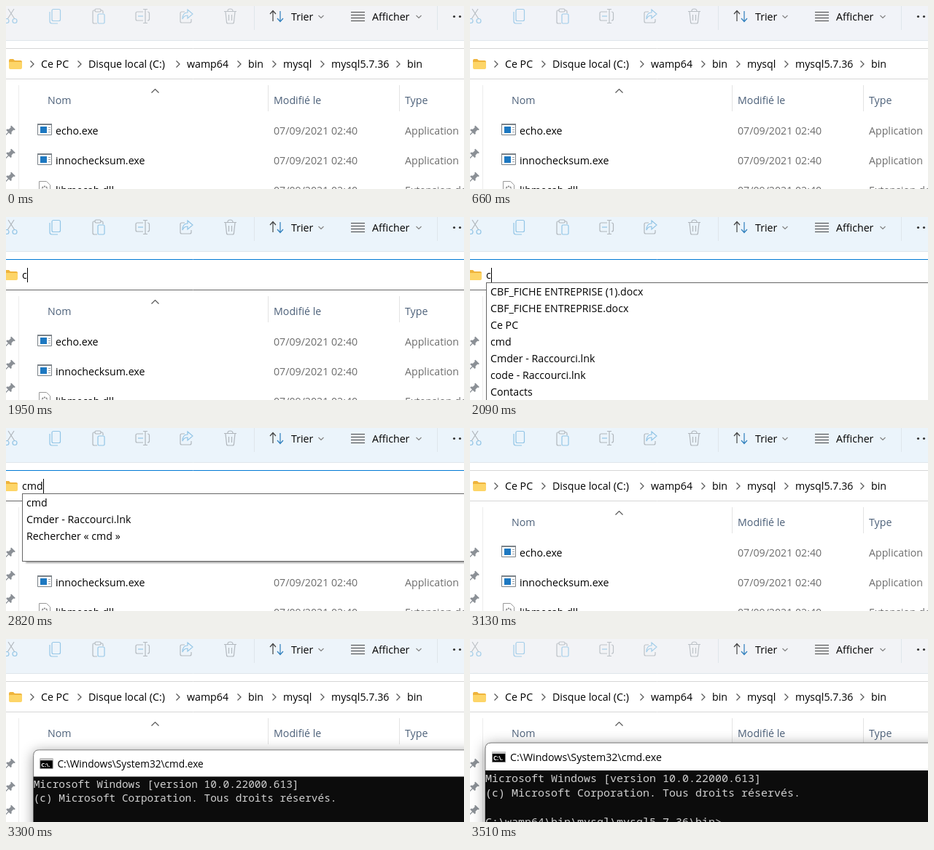
Animation, 628 px wide and 252 px high, one loop 5.15 s. Source, as an HTML page:

```html
<!DOCTYPE html>
<html lang="fr">
<head>
<meta charset="utf-8">
<title>Ouvrir cmd depuis l'explorateur</title>
<style>
  html, body { margin: 0; width: 100%; height: 100%; overflow: hidden; background: #fff; }
  svg { display: block; width: 628px; height: 252px; }
  text { font: 14.2px "Open Sans", "Noto Sans", sans-serif; fill: #000; white-space: pre; }
  .head { fill: #4c6079; }
  .dim { fill: #6d6d6d; }
  .line { fill: none; stroke: #555; stroke-width: 1.2; }
  .blue { fill: none; stroke: #92c5e6; stroke-width: 1.2; }
  .gray { fill: none; stroke: #b0b6bc; stroke-width: 1.2; }
  .console text { font: 15px "Noto Sans Mono", "DejaVu Sans Mono", monospace; fill: #d0d0d0; }
  #cmd { transform-origin: 480px 413px; }
</style>
</head>
<body>
<svg viewBox="0 0 628 252">
  <defs>
    <path id="chevron" class="line" d="M-2.5-4.5 2 0-2.5 4.5"/>
    <path id="pin" fill="#8b9096" transform="scale(.88)" d="M4-7l6 6-1 1-2-.3-3 3 .2 3-1.5 1.2-3-3-4 4-1-1 4-4-3-3 1.2-1.5 3 .2 3-3-.3-2z"/>
    <g id="exe">
      <path fill="#fff" stroke="#7b8288" d="M.5.5h19v15H.5z"/>
      <path fill="#7b8288" d="M0 0h20v2H0z"/>
      <path fill="#1d78c1" d="M4 4h9v9H4z"/>
      <path stroke="#9aa3ab" d="M15 5.500h3M15 8.500h3M15 11.500h3"/>
    </g>
    <g id="folder">
      <path fill="#efb43c" d="M0 2q0-2 2-2h4l2 2h8q2 0 2 2v8H0z"/>
      <path fill="#fdd568" d="M0 5q0-1 1-1h16q1 0 1 1v7q0 2-2 2H2q-2 0-2-2z"/>
    </g>
  </defs>

  <rect width="628" height="252" fill="#fff"/>
  <rect width="628" height="48" fill="#f2f3f6"/>
  <rect id="tint" width="628" height="48" fill="#ebf4fb"/>
  <path stroke="#dfe6eb" d="M0 47.500h628M340.500 0v33M591.500 0v33"/>

  <g id="tools">
    <path class="gray" d="M3 4l9 14M11 4L2 18"/>
    <circle class="blue" cx="1" cy="20.500" r="3"/><circle class="blue" cx="12" cy="20.500" r="3"/>
    <rect class="blue" x="63" y="4.500" width="11.500" height="16" rx="2"/>
    <path class="blue" d="M60 8v13q0 3 3 3h8"/>
    <path class="gray" d="M122 6h-2q-1 0-1 2v14q0 2 2 2h4M130 6h2q1 0 1 2v2"/>
    <rect class="gray" x="122" y="4" width="8" height="4" rx="1.500"/>
    <rect class="blue" x="126" y="11" width="9" height="13" rx="1.500"/>
    <path class="gray" d="M188 8h-8q-2 0-2 2v8q0 2 2 2h8M194 8q2.500 0 2.500 2v8q0 2-2.500 2M188 4.500h6M188 23.500h6M191 4.500v19"/>
    <path class="blue" stroke-width="2" d="M181 14h7"/>
    <path class="gray" d="M245 8h-4q-2 0-2 2v11q0 2 2 2h11q2 0 2-2v-3"/>
    <path class="blue" d="M249 5l7 6-7 6v-4q-5 0-7 5 0-9 7-9z"/>
    <path class="gray" d="M299 7.500h17M304 7q0-3 3.500-3t3.500 3M301 8l1.500 14q0 2 2 2h6q2 0 2-2L314 8M305.500 12v8M309.500 12v8"/>
  </g>
  <g fill="none" stroke-width="1.2">
    <path stroke="#444" d="M366 21V7M362 11l4-4.500 4 4.500"/>
    <path stroke="#2f7fbd" d="M376 7v14M372 17l4 4.500 4-4.500"/>
    <path stroke="#444" d="M473 8.500h19M473 12.500h19M473 16.500h19M473 20.500h19"/>
    <path stroke="#858585" d="M428.500 13l3.500 3.500 3.500-3.500M562.500 13l3.500 3.500 3.500-3.500"/>
  </g>
  <text x="391" y="20">Trier</text>
  <text x="502" y="20">Afficher</text>
  <g fill="#333"><circle cx="614.500" cy="14.500" r="1.600"/><circle cx="622.500" cy="14.500" r="1.600"/></g>

  <g id="files">
    <path stroke="#ececec" d="M17.500 109v143"/>
    <path stroke="#e3e3e3" d="M359.500 109v36M539.500 109v36"/>
    <path class="line" d="M199.500 119.500l5-5 5 5"/>
    <use href="#pin" x="4" y="171"/><use href="#pin" x="4" y="203"/><use href="#pin" x="4" y="235"/>
    <text class="head" x="57" y="135">Nom</text>
    <text class="head" x="367" y="135">Modifié le</text>
    <text class="head" x="547" y="135">Type</text>
    <use href="#exe" x="43" y="162"/><use href="#exe" x="43" y="203"/>
    <path fill="#fff" stroke="#999" d="M45.500 260v-18.500h10l5 5V260"/>
    <circle cx="53" cy="252" r="3.500" fill="none" stroke="#888" stroke-width="2" stroke-dasharray="2 1"/>
  </g>

  <g id="crumbs">
    <path stroke="#d6d6d6" d="M0 58.500h628M0 100.500h628"/>
    <use href="#folder" x="4" y="73"/>
  </g>

  <g id="edit">
    <path stroke="#0078d4" d="M0 58.500h628"/>
    <path stroke="#666" d="M0 100.500h628"/>
    <use href="#folder" x="-2" y="73"/>
    <rect id="selection" x="22" y="70" width="209" height="20" fill="#0078d7"/>
    <text id="typed" x="22" y="85"></text>
    <rect id="caret" y="70" width="1" height="20"/>
  </g>

  <g id="menus"></g>

  <g id="cmd">
    <g style="filter: drop-shadow(0 3px 9px rgba(0,0,0,.4))">
      <path fill="#fff" stroke="#777" d="M21 520V151q0-8 8-8h900v377z"/>
    </g>
    <path fill="#0c0c0c" d="M21 181h908v339H21z"/>
    <path fill="#000" stroke="#8a8a8a" d="M30.500 155.500h18v14h-18z"/>
    <path fill="#c8c8c8" d="M30 155h19v3H30z"/>
    <text x="32" y="167" style="font-size: 8px; font-weight: 700; fill: #fff">C:\.</text>
    <text x="55" y="168">C:\Windows\System32\cmd.exe</text>
    <g class="console">
      <text x="21" y="197">Microsoft Windows [version 10.0.22000.613]</text>
      <text x="21" y="217">(c) Microsoft Corporation. Tous droits réservés.</text>
      <text x="21" y="257">C:\wamp64\bin\mysql\mysql5.7.36\bin&gt;</text>
    </g>
  </g>
</svg>

<script>
const LOOP = 5150, STEP = 70;
const FOCUS = 660, EDIT = 740, TYPE_C = 1950, TYPE_M = 2290, TYPE_D = 2820, ENTER = 3080;
const $ = id => document.getElementById(id);
const add = (id, markup) => $(id).insertAdjacentHTML('beforeend', markup);
const label = (x, y, s, cls = '') => `<text x="${x}" y="${y}" class="${cls}">${s}</text>`;
const show = (id, on) => $(id).style.display = on ? '' : 'none';
const clamp = v => Math.min(1, Math.max(0, v));

['echo.exe', 'innochecksum.exe', 'libmecab.dll'].forEach((name, i) => {
  const y = 177 + 41 * i;
  add('files', label(68, y, name) + label(367, y, '07/09/2021 02:40', 'dim') +
    label(547, y, i < 2 ? 'Application' : 'Extension de l’application', 'dim'));
});

[[48, 'Ce PC'], [113, 'Disque local (C:)'], [248, 'wamp64'], [332, 'bin'], [380, 'mysql'],
 [446, 'mysql5.7.36'], [550, 'bin']].forEach(([x, name]) =>
  add('crumbs', `<use href="#chevron" x="${x - 12}" y="80"/>` + label(x, 85, name)));

function addMenu(id, slots, items) {
  const rows = items.map((s, i) => label(28, 108 + 23 * i, s)).join('');
  add('menus', `<g id="${id}"><rect x="22.5" y="90.5" width="640" height="${slots * 23 + 1}"
    fill="#fff" stroke="#666" style="filter: drop-shadow(5px 2px 1px rgba(0,0,0,.35))"/>${rows}</g>`);
}
addMenu('menuC', 10, ['CBF_FICHE ENTREPRISE (1).docx', 'CBF_FICHE ENTREPRISE.docx', 'Ce PC', 'cmd',
  'Cmder - Raccourci.lnk', 'code - Raccourci.lnk', 'Contacts']);
for (const query of ['cm', 'cmd'])
  addMenu('menu_' + query, 4, ['cmd', 'Cmder - Raccourci.lnk', `Rechercher « ${query} »`]);

function draw(t) {
  const editing = t >= EDIT && t < ENTER;
  const selected = t < TYPE_C;
  const [typed, caretX] = selected ? ['C:\\Windows\\System32\\cmd.exe', 231]
    : t < TYPE_M ? ['c', 29] : t < TYPE_D ? ['cm', 42] : ['cmd', 51];

  show('crumbs', !editing);
  show('edit', editing);
  show('selection', selected);
  show('caret', !selected || t < 1400);
  $('typed').textContent = typed;
  $('typed').style.fill = selected ? '#fff' : '';
  $('caret').setAttribute('x', caretX);
  show('menuC', t >= TYPE_C + STEP && t < TYPE_M);
  show('menu_cm', t >= TYPE_M && t < TYPE_D);
  show('menu_cmd', t >= TYPE_D && t < ENTER);

  // Screen updates arrive every STEP ms while the windows fade.
  const opening = Math.floor((t - ENTER) / STEP);
  const gained = clamp((Math.floor((t - FOCUS) / STEP) + 1) / 4);
  const active = gained - clamp((opening - 2) / 4);
  $('tint').style.opacity = active;
  $('tools').style.opacity = 0.8 + 0.2 * active;

  const q = clamp((opening - 1) / 5);
  show('cmd', q > 0);
  $('cmd').style.opacity = clamp(q * 2.5);
  $('cmd').style.transform = `scale(${1 - 0.168 * (1 - q) ** 3})`;
}

const start = performance.now();
function tick() {
  draw((performance.now() - start) % LOOP);
  requestAnimationFrame(tick);
}
tick();
</script>
</body>
</html>
```
